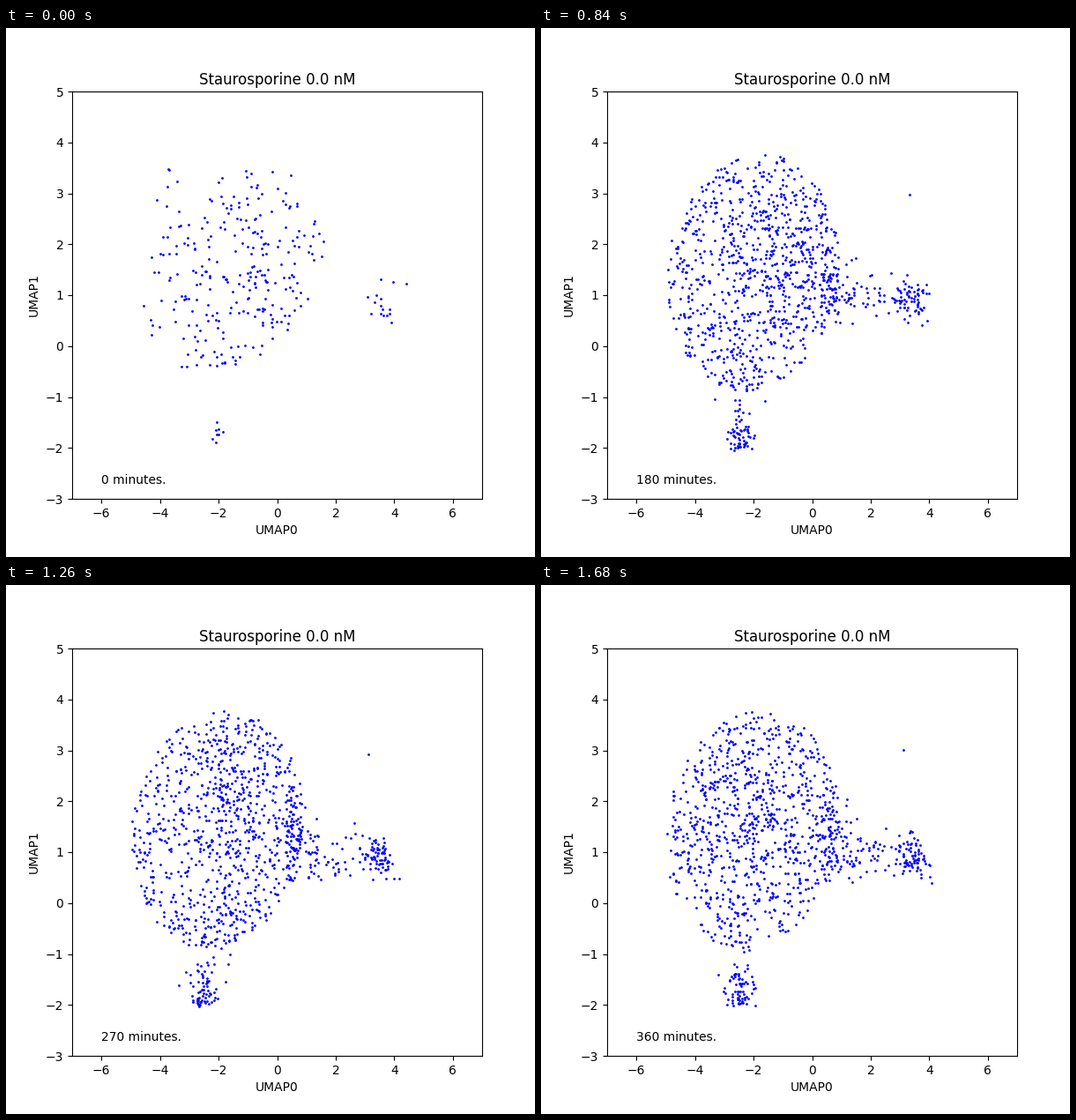
A matplotlib script for the animation above (1.82 s loop, 600 by 600 pixels).

```python
import numpy as np
import matplotlib.pyplot as plt
from matplotlib.animation import FuncAnimation

FRAMES, STEP_MIN, INTERVAL = 13, 30, 140


def sample_body(rng, count, center, radii, tilt, spots):
    """Fill a sheared ellipse, denser around the given spots."""
    angle = rng.uniform(0, 2 * np.pi, 8 * count)
    r = np.sqrt(rng.random(8 * count))
    dy = radii[1] * r * np.sin(angle)
    x = center[0] + radii[0] * r * np.cos(angle) + tilt * dy
    y = center[1] + dy
    weight = 0.45
    for cx, cy in spots:
        weight = weight + 0.25 * np.exp(-((x - cx) ** 2 + (y - cy) ** 2))
    keep = rng.random(len(x)) < weight
    return np.c_[x, y][keep][:count]


def sample_arm(rng, count):
    """Bridge narrowing to the right, ending in a small drooping group."""
    bridge = int(0.65 * count)
    x = np.r_[0.3 + rng.exponential(1.0, bridge),
              rng.normal(3.45, 0.34, count - bridge)]
    root = np.clip((1.9 - x) / 1.6, 0, 1)
    droop = np.clip(x - 3.6, 0, 1)
    y = 0.95 + 0.4 * root - 0.8 * droop
    y = y + rng.normal(0, 0.22 + 0.35 * root)
    keep = (x < 4.17) & (y > 0.37) & (y < 2.7 - 0.32 * x)
    return np.c_[x, y][keep]


def sample_tail(rng, count):
    """Tail widening upwards from a packed lower end."""
    rise = rng.exponential(0.45, count)
    x = -2.5 + rng.normal(0, 0.2 + 0.2 * np.clip(rise, 0, 1.3))
    y = -2 + rise + rng.normal(0, 0.03, count)
    return np.c_[x, y][rise < 1.7]


def first_cells(rng):
    body = sample_body(rng, 258, (-1.5, 1.5), (3.0, 2.0), 0.45,
                       [(-0.3, 2.0), (-0.5, 1.0)])
    group = rng.normal((3.6, 0.95), (0.35, 0.28), (16, 2))
    tail = rng.normal((-2.1, -1.7), (0.13, 0.17), (8, 2))
    strays = rng.normal((-3.8, 2.9), (0.35, 0.35), (6, 2))
    return np.r_[body, group, tail, strays]


def later_cells(rng, i):
    swing = 0.8 * np.array([np.cos(i / 2), np.sin(i / 2)])
    middle = np.array([-1.6, 1.8])
    body = sample_body(rng, 860, (-2.05, 1.45), (2.95, 2.33), 0.12,
                       [middle + swing, middle - swing])
    lone = rng.normal((3.2, 3.0), 0.08, (1, 2))
    return np.r_[body, sample_arm(rng, 170 + 4 * i),
                 sample_tail(rng, 72 + i), lone]


def cells(i):
    rng = np.random.default_rng(100 + i)
    return later_cells(rng, i) if i else first_cells(rng)


fig, ax = plt.subplots(figsize=(6, 6), dpi=100)
ax.set(xlim=(-7, 7), ylim=(-3, 5), xlabel="UMAP0", ylabel="UMAP1",
       title="Staurosporine 0.0 nM")
dots, = ax.plot([], [], "o", color="blue", ms=1)
label = ax.text(-6, -2.7, "")


def update(i):
    dots.set_data(*cells(i).T)
    label.set_text(f"{i * STEP_MIN} minutes.")
    return dots, label


anim = FuncAnimation(fig, update, frames=FRAMES, interval=INTERVAL,
                     repeat=True, repeat_delay=0)
plt.show()
```
